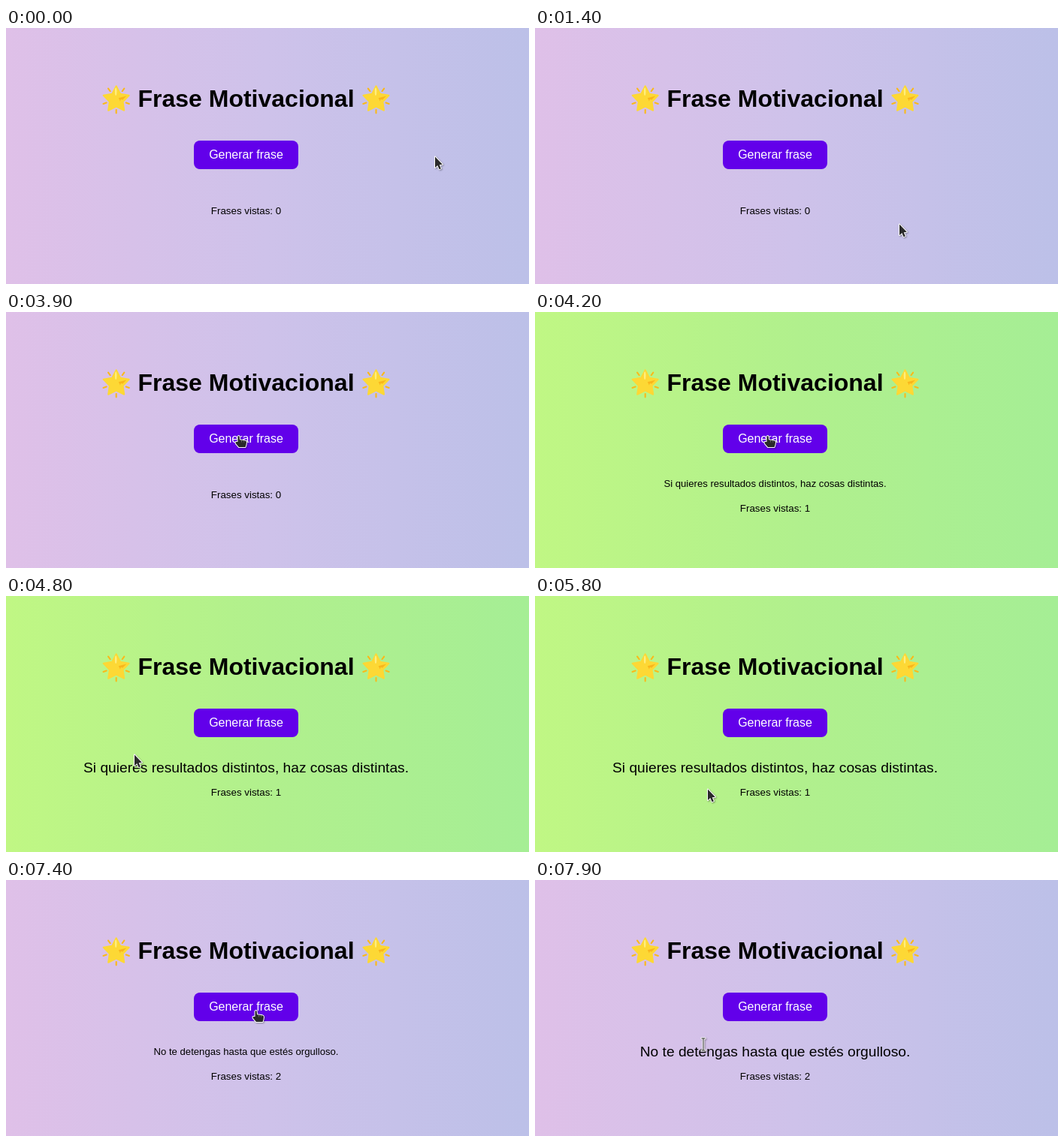
These frames come from a looping animation (696 px wide and 341 px high, 8000 ms). An HTML page with a canvas:

```html
<!DOCTYPE html>
<html lang="es">
<head>
<meta charset="utf-8">
<title>Frase Motivacional</title>
<style>
  html, body { margin: 0; width: 100%; height: 100%; overflow: hidden; }
  #stage {
    position: absolute; left: 0; top: 0; width: 696px; height: 341px; overflow: hidden;
    font-family: "Liberation Sans", Arial, sans-serif; color: #000;
    background: linear-gradient(90deg, #dfc0e8, #cec2ea 50%, #bcc0e8);
  }
  #stage.green { background: linear-gradient(90deg, #c0f784, #b1f08d 50%, #a5ee95); }
  .line {
    position: absolute; left: 0; width: 639px; margin: 0;
    text-align: center; white-space: nowrap;
  }
  #title { top: 76px; font-size: 32px; font-weight: bold; line-height: 36px; }
  #button {
    position: absolute; left: 250.15px; top: 150px; width: 138.7px; height: 38px;
    box-sizing: border-box; padding-top: 10px; border-radius: 8px;
    background: #6200ea; color: #fff; font-size: 16px; line-height: 18px;
    text-align: center; white-space: nowrap;
  }
  #phrase { top: 218px; font-size: 19.2px; line-height: 21px; height: 22px; }
  #count { top: 236px; font-size: 13.333px; line-height: 15px; }
  canvas { position: absolute; left: 0; top: 0; }
</style>
</head>
<body>
<div id="stage">
  <h1 id="title" class="line">Frase Motivacional</h1>
  <div id="button">Generar frase</div>
  <p id="phrase" class="line"></p>
  <p id="count" class="line">Frases vistas: 0</p>
  <canvas id="art" width="696" height="341"></canvas>
</div>
<script>
const LOOP = 8000, STEP = 100;
const CLICKS = [4200, 7400];
const PHRASES = [
  '',
  'Si quieres resultados distintos, haz cosas distintas.',
  'No te detengas hasta que estés orgulloso.'
];

// Pointer sweeps: a smooth curve through evenly timed points, then a rest
const SWEEPS = [
  { from: 200, every: 300, points: [
    [571, 171], [560, 35], [85, 130], [270, 290], [485, 261],
    [245, 150], [400, 296], [480, 125], [347, 177]] },
  { from: 2900, every: 250, points: [
    [347, 177], [355, 145], [285, 140], [285, 182], [309, 164]] },
  { from: 4200, every: 400, points: [
    [309, 164], [240, 200], [110, 222], [110, 262],
    [230, 257], [385, 220], [338, 147], [332, 173]] },
  { from: 7400, every: 500, points: [[332, 173], [224, 219]] }
];

const $ = id => document.getElementById(id);
const stage = $('stage'), phrase = $('phrase'), count = $('count');
const ctx = $('art').getContext('2d');

const clamp = (v, lo, hi) => Math.max(lo, Math.min(hi, v));

function spline(a, b, c, d, u) {
  return b + u / 2 * (c - a + u * (2 * a - 5 * b + 4 * c - d + u * (3 * (b - c) + d - a)));
}

function pointerAt(t) {
  const { from, every, points } = SWEEPS.filter(s => s.from <= t).pop() || SWEEPS[0];
  const last = points.length - 1;
  const pos = clamp((t - from) / every, 0, last);
  const i = Math.min(Math.floor(pos), last - 1);
  const at = k => points[clamp(k, 0, last)];
  return [0, 1].map(n => Math.round(
    spline(at(i - 1)[n], at(i)[n], at(i + 1)[n], at(i + 2)[n], pos - i)));
}

function trace(points) {
  ctx.beginPath();
  points.forEach(([x, y]) => ctx.lineTo(x, y));
  ctx.closePath();
}

const polar = (r, deg) => {
  const a = deg * Math.PI / 180;
  return [r * Math.cos(a), r * Math.sin(a)];
};

function drawStar(cx, cy) {
  ctx.save();
  ctx.translate(cx, cy);
  ctx.scale(1.05, 1.05);
  ctx.lineCap = ctx.lineJoin = 'round';

  ctx.strokeStyle = '#fbb918';
  ctx.lineWidth = 2;
  for (let i = 0; i < 5; i++) {
    ctx.beginPath();
    ctx.moveTo(...polar(13, -54 + i * 72));
    ctx.lineTo(...polar(17.2, -54 + i * 72));
    ctx.stroke();
  }

  const body = [];
  for (let i = 0; i < 10; i++) body.push(polar(i % 2 ? 8.8 : 17, -90 + i * 36));
  trace(body);
  ctx.fillStyle = ctx.strokeStyle = '#fdd835';
  ctx.fill();
  ctx.stroke();

  ctx.fillStyle = '#ffee7c';
  ctx.beginPath();
  ctx.ellipse(-0.5, -10, 1.2, 5, 0, 0, 7);
  ctx.fill();
  ctx.fillStyle = '#f9b61c';
  trace([[3, -2], [13, -4.5], [8, 0.5], [6, -0.5], [5, 2]]);
  ctx.fill();
  ctx.restore();
}

function paintPointer() {
  ctx.save();
  ctx.shadowColor = 'rgba(0,0,0,.35)';
  ctx.shadowBlur = 2;
  ctx.shadowOffsetX = ctx.shadowOffsetY = 1;
  ctx.strokeStyle = '#fff';
  ctx.lineWidth = 2;
  ctx.lineJoin = 'round';
  ctx.stroke();
  ctx.restore();
  ctx.fillStyle = '#2a2a2a';
  ctx.fill();
}

function drawArrow() {
  trace([[0, 0.5], [0, 15], [3.3, 12], [5.6, 17.2], [7.9, 16.2], [5.7, 11.2], [9.8, 10.8]]);
  paintPointer();
}

function drawHand() {
  ctx.beginPath();
  ctx.moveTo(-0.5, 9);
  ctx.lineTo(-0.5, 2);
  ctx.quadraticCurveTo(0.5, 0, 1.7, 2);
  ctx.lineTo(2, 6.3);
  ctx.lineTo(9, 7.3);
  ctx.quadraticCurveTo(11, 7.8, 11, 9.5);
  ctx.lineTo(10.5, 13);
  ctx.lineTo(9.5, 16);
  ctx.lineTo(1, 16);
  ctx.lineTo(-3.3, 11);
  ctx.quadraticCurveTo(-4.2, 8.7, -2.2, 9);
  ctx.closePath();
  paintPointer();
  ctx.fillStyle = '#999';
  for (const x of [4.5, 7.5]) ctx.fillRect(x, 7, 0.6, 2.5);
}

function drawBeam() {
  ctx.beginPath();
  ctx.rect(-0.5, -7.5, 1, 15);
  for (const y of [-8.5, 7.5]) ctx.rect(-2.5, y, 5, 1);
  paintPointer();
}

function drawPointer(t, seen) {
  const [x, y] = pointerAt(t);
  const over = (half, top, bottom) => Math.abs(x - 319.5) <= half && y >= top && y <= bottom;
  const overText = over(192, 76, 112)
    || over([0, 217, 180][seen], 218, 240)
    || (seen ? over(47, 254, 269) : over(47, 236, 251));
  ctx.save();
  ctx.translate(x, y);
  if (over(69.5, 150, 188)) drawHand();
  else if (overText) drawBeam();
  else drawArrow();
  ctx.restore();
}

function render(t) {
  const seen = CLICKS.filter(c => t >= c).length;
  stage.className = seen === 1 ? 'green' : '';
  phrase.textContent = PHRASES[seen];
  count.textContent = 'Frases vistas: ' + seen;
  count.style.top = (seen ? 254 : 236) + 'px';

  // A new phrase pops up to full size
  const u = seen ? Math.min(1, (t - CLICKS[seen - 1]) / 300) : 1;
  const scale = 1 - 0.316 * (1 - u) ** 2;
  phrase.style.transform = scale < 1 ? `scale(${scale})` : 'none';

  ctx.clearRect(0, 0, 696, 341);
  drawStar(146.7, 95.3);
  drawStar(492.5, 95.3);
  drawPointer(t, seen);
}

const start = performance.now();
function tick() {
  const t = (performance.now() - start) % LOOP;
  render(Math.floor(t / STEP) * STEP);
  requestAnimationFrame(tick);
}
tick();
</script>
</body>
</html>
```
